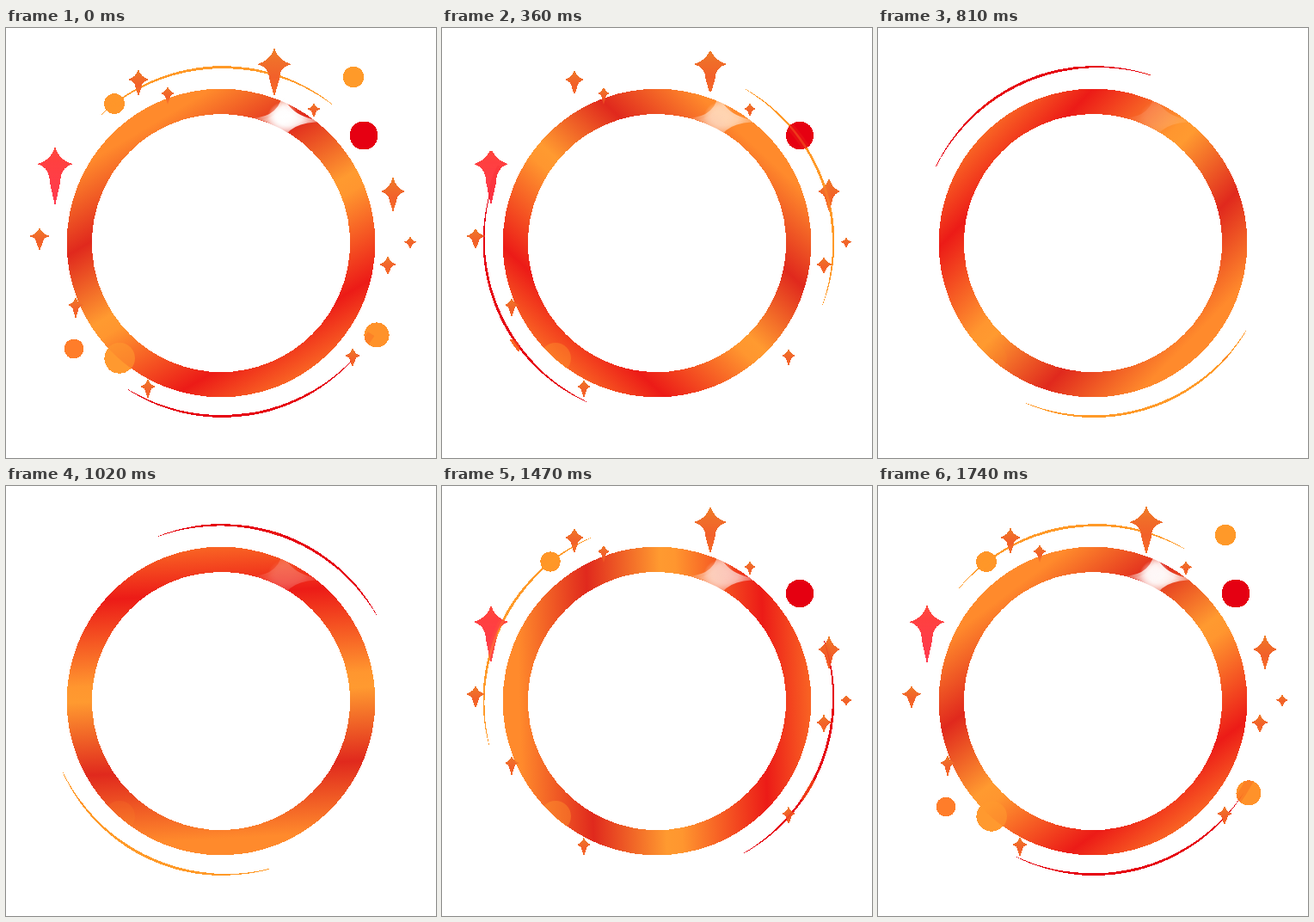
An HTML page that plays this animation: 500x500 px, repeating every 1.77 s.

```html
<!DOCTYPE html>
<html lang="en">
<head>
<meta charset="utf-8">
<title>Sparkling ring</title>
<style>
  html, body { margin: 0; height: 100%; overflow: hidden; background: #fff; }
  svg { display: block; width: 100%; height: 100%; }
</style>
</head>
<body>
<svg viewBox="0 0 500 500">
  <defs>
    <!-- one-bit transparency: anything under half alpha disappears -->
    <filter id="cut" filterUnits="userSpaceOnUse" x="0" y="0" width="500" height="500" color-interpolation-filters="sRGB">
      <feComponentTransfer><feFuncA type="discrete" tableValues="0 1"/></feComponentTransfer>
    </filter>
    <linearGradient id="metal" gradientUnits="userSpaceOnUse" x1="-180" x2="180" y1="0" y2="0">
      <stop offset="0" stop-color="#f96524"/>
      <stop offset=".153" stop-color="#ec1b17"/>
      <stop offset=".43" stop-color="#ff962f"/>
      <stop offset=".48" stop-color="#ff9a30"/>
      <stop offset=".717" stop-color="#e0291d"/>
      <stop offset=".944" stop-color="#ff8a2c"/>
    </linearGradient>
    <linearGradient id="amber" x2="0" y2="1">
      <stop offset="0" stop-color="#f08228" stop-opacity=".7"/>
      <stop offset=".25" stop-color="#f0702a"/>
      <stop offset=".6" stop-color="#f2602a"/>
      <stop offset="1" stop-color="#f8702a" stop-opacity=".7"/>
    </linearGradient>
    <linearGradient id="rose" x2="0" y2="1">
      <stop offset="0" stop-color="#ff4a3c" stop-opacity=".7"/>
      <stop offset=".25" stop-color="#ff4040"/>
      <stop offset="1" stop-color="#ff3a50" stop-opacity=".75"/>
    </linearGradient>
    <radialGradient id="glow">
      <stop offset="0" stop-color="#fff"/>
      <stop offset=".35" stop-color="#fff" stop-opacity=".9"/>
      <stop offset="1" stop-color="#fff" stop-opacity="0"/>
    </radialGradient>
    <g id="arc">
      <path d="M147-142A204.5 204.5 0 0 1 147 142A212 212 0 0 0 147-142"/>
      <path d="M130-156A203 203 0 0 1 130 156" fill="none" stroke="currentColor" stroke-width="9" opacity=".16"/>
    </g>
  </defs>
  <g filter="url(#cut)">
    <circle r="164.7" transform="translate(250 250)" fill="none" stroke="url(#metal)" stroke-width="29.3"/>
    <g id="arcs">
      <use href="#arc" fill="#ff9a2a" color="#ff9a2a" transform="rotate(-93)"/>
      <use href="#arc" fill="#e60012" color="#e60012" transform="rotate(82)"/>
    </g>
    <g id="lights"></g>
    <g id="flare" transform="translate(322 104)" fill="url(#glow)">
      <circle r="18"/>
      <path d="M0-34Q1 0 52 5Q4 4 0 30Q-3 4-38 1Q-1 0 0-34"/>
      <path d="M0-18Q3 0 38 5Q0 18-30 4Q-3 0 0-18" opacity=".45"/>
    </g>
  </g>
</svg>
<script>
const LOOP = 1770, STEP = 30;
const get = id => document.getElementById(id);

// x, y, half width, top, bottom
const stars = [
  [312, 42, 20, 20, 39], [154, 60, 12, 13, 20], [188, 76, 8, 9, 13],
  [358, 94, 8, 8, 11], [39, 242, 12, 11, 18], [450, 190, 14, 18, 25],
  [470, 249, 8, 7, 8], [444, 275, 10, 11, 13], [403, 381, 9, 10, 14],
  [165, 417, 9, 10, 15], [81, 322, 9, 10, 17], [57, 158, 21, 21, 50, "rose"]
];
// x, y, radius, colour, strength
const dots = [
  [404, 57, 12.5, "#ff9a2a", .7], [126, 88, 12, "#ff962a", .79],
  [79, 373, 11.5, "#ff7d2a", .72], [431, 357, 15, "#ff922a", .54],
  [132, 384, 18, "#ff9a30", .6], [416, 125, 16.5, "#e60012", 1]
];

const drawDot = ([x, y, r, fill, strength]) =>
  `<circle cx="${x}" cy="${y}" r="${r}" fill="${fill}" opacity="${strength}"/>`;

// four points, the lowest drawn out into a tail
const drawStar = ([x, y, w, top, bottom, fill = "amber"]) => {
  const a = w * .2, b = top * .2, c = w * .3, d = bottom * .42;
  return `<path transform="translate(${x} ${y})" fill="url(#${fill})"
    d="M0 ${-top}Q${a} ${-b} ${w} 0Q${c} ${b} ${c} ${d}L0 ${bottom}L${-c} ${d}Q${-c} ${b} ${-w} 0Q${-a} ${-b} 0 ${-top}"/>`;
};

get("lights").innerHTML = dots.map(drawDot).join("") + stars.map(drawStar).join("");

function draw(now) {
  const t = Math.floor(now % LOOP / STEP) * STEP;
  const turn = 360 * t / LOOP;
  const light = .1 + .9 * Math.abs(1 - 2 * t / LOOP);
  get("metal").setAttribute("gradientTransform", `rotate(${turn - 120.5})`);
  get("arcs").setAttribute("transform", `translate(252 248.5) rotate(${turn})`);
  get("lights").setAttribute("opacity", light);
  get("flare").setAttribute("opacity", light);
}

const start = performance.now();
function tick() {
  draw(performance.now() - start);
  requestAnimationFrame(tick);
}
tick();
</script>
</body>
</html>
```
